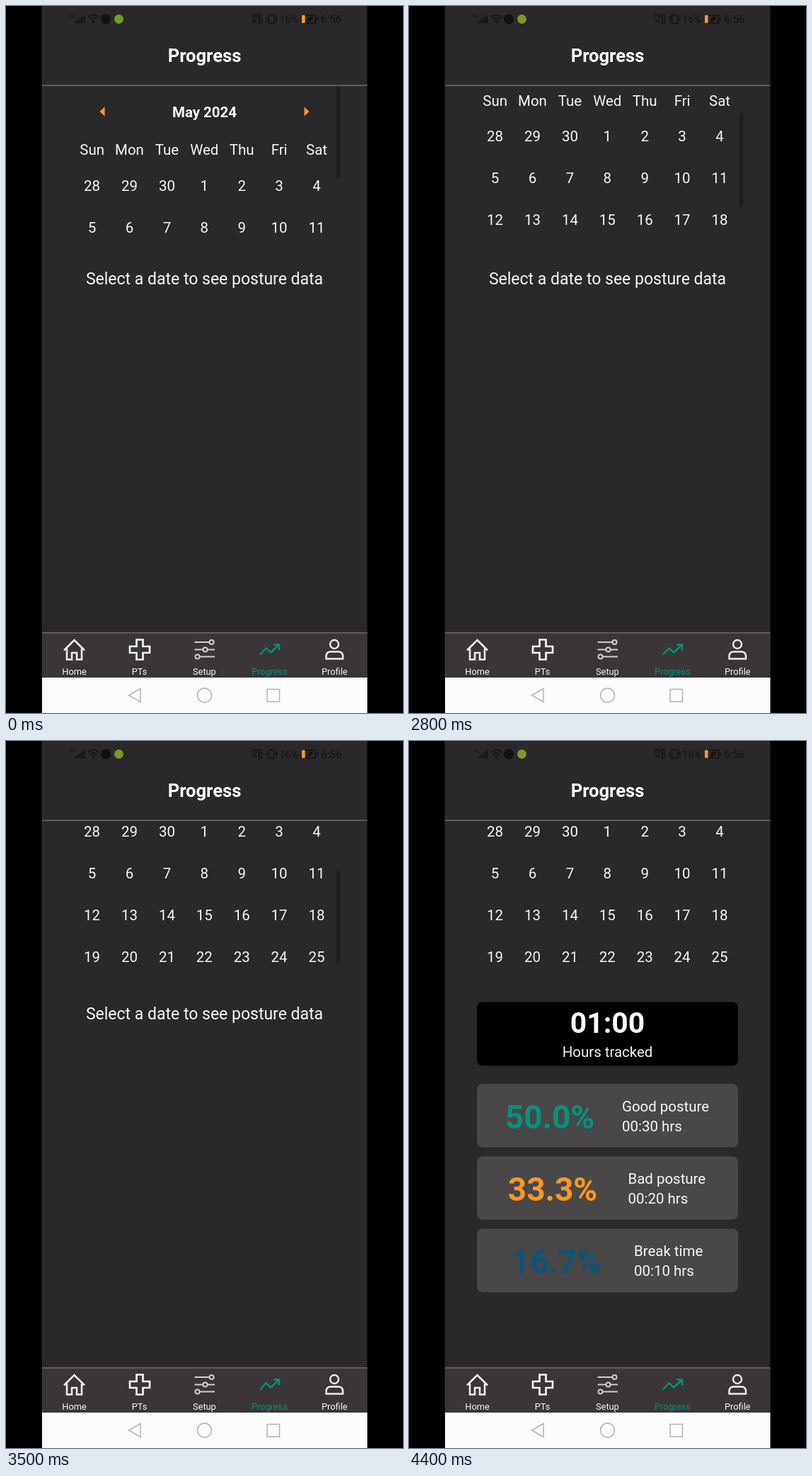
An HTML page with a canvas that plays this animation: 561 px wide and 998 px high, repeating every 8000 ms.

```html
<!DOCTYPE html>
<html lang="en">
<head>
<meta charset="utf-8">
<title>Posture progress</title>
<style>
html, body { margin: 0; width: 100%; height: 100%; overflow: hidden; background: #000; }
canvas { display: block; }
</style>
</head>
<body>
<canvas id="stage" width="561" height="998"></canvas>
<script>
const ctx = document.getElementById('stage').getContext('2d');
const LOOP = 8000, STEP = 100, SCROLL_END = 125.5;
const WHITE = '#f8f7f8', ORANGE = '#f99b2d', TEAL = '#07917d', DARK = '#131213';
const BODY = 20.44;

function rect(x, y, w, h, color, radius = 0) {
  ctx.fillStyle = color;
  ctx.beginPath();
  ctx.roundRect(x, y, w, h, radius);
  ctx.fill();
}

function text(str, x, y, size = BODY, color = WHITE, weight = 400, align = 'center') {
  ctx.font = `${weight} ${size}px Roboto, sans-serif`;
  ctx.textAlign = align;
  ctx.fillStyle = color;
  ctx.fillText(str, x, y);
}

function line(d, color, width) {
  ctx.strokeStyle = color;
  ctx.lineWidth = width;
  ctx.stroke(new Path2D(d));
}

function fill(d, color) {
  ctx.fillStyle = color;
  ctx.fill(new Path2D(d));
}

function dot(x, y, r, color) {
  ctx.fillStyle = color;
  ctx.beginPath();
  ctx.arc(x, y, r, 0, Math.PI * 2);
  ctx.fill();
}

// A drag, then a decaying fling that settles at the end.
function scrollAt(t) {
  if (t < 2600) return 0;
  if (t < 2800) return 20 + (t - 2600) * 0.2475;
  if (t < 3500) return SCROLL_END - 56 * Math.exp((2800 - t) / 232);
  return SCROLL_END;
}

function statusBar() {
  text('4G', 90, 16, 6, DARK, 400, 'left');
  for (let i = 0; i < 5; i++) rect(98 + i * 2.9, 21.5 - i * 2.2, 1.9, 3 + i * 2.2, DARK);
  line('M116 16Q123.500 9 131 16M118.500 19Q123.500 14.500 128.500 19M121 21.500Q123.500 19.500 126 21.500', DARK, 1.6);
  dot(123.5, 23.5, 1.3, DARK);
  dot(141, 18.5, 7, DARK);
  dot(159.5, 18.5, 6.5, '#779b2c');
  line('M348 16V12.500H361V24H356M348 18.500Q353.500 18.500 353.500 24M348 21.500Q350.500 21.500 350.500 24M351 15.500H358V21H356', DARK, 1.3);
  line('M371.500 12.500H379.500V24.500H371.500ZM368.500 14.500V22.500M382.500 14.500V22.500', DARK, 1.4);
  text('16%', 386.5, 23.5, 14.2, DARK, 400, 'left');
  rect(418, 13, 4.5, 11, ORANGE, 1);
  line('M423 13H437.500V24H423M440 16V21', DARK, 1.4);
  fill('M426 20Q426 15 434 15Q433 22 426 22Z', DARK);
  text('6:56', 445, 23.7, 15.2, DARK, 400, 'left');
}

function calendar(t) {
  const scroll = scrollAt(t);
  ctx.save();
  ctx.beginPath();
  ctx.rect(90, 113, 382, 231);
  ctx.clip();

  ctx.save();
  ctx.translate(0, -scroll);
  fill('M132.500 149L139.500 142.500V155.500Z M428.500 149L421.500 142.500V155.500Z', ORANGE);
  text('May 2024', 280.5, 156.8, BODY, WHITE, 700);
  ['Sun', 'Mon', 'Tue', 'Wed', 'Thu', 'Fri', 'Sat'].forEach((day, i) =>
    text(day, 121.6 + i * 52.9, 210.2));
  for (let i = 0; i < 35; i++) {
    const day = i < 3 ? 28 + i : i - 2;
    const color = i < 3 ? '#757375' : day === 18 ? ORANGE : WHITE;
    if (i === 18 && t >= 3800) {
      ctx.globalAlpha = t < 4200 ? 0.2 : Math.min(1, 0.5 + (t - 4200) / 400);
    }
    text(day, 121.6 + i % 7 * 52.9, 260.8 + Math.floor(i / 7) * 59);
    ctx.globalAlpha = 1;
  }
  ctx.restore();

  ctx.globalAlpha = t < 3900 ? 1 : Math.max(0, 1 - (t - 3800) / 400);
  rect(467, 113 + scroll * 0.565, 5, 130, '#1f1d1f');
  ctx.restore();
}

function card(y, percent, px, color, label, time, x) {
  rect(96, y, 369, 89.5, '#4a4748', 8);
  text(percent, px, y + 63, 46, color, 700);
  text(label, x, y + 39, BODY, WHITE, 400, 'left');
  text(time, x, y + 66.5, BODY, WHITE, 400, 'left');
}

function results() {
  rect(96, 368.5, 369, 90, '#000', 8);
  text('01:00', 280.5, 412.4, 40.9, '#fff', 700);
  text('Hours tracked', 280.5, 445.5);
  card(484, '50.0%', 199, TEAL, 'Good posture', '00:30 hrs', 301);
  card(586.2, '33.3%', 203, '#ff9721', 'Bad posture', '00:20 hrs', 309.5);
  card(688.4, '16.7%', 208, '#0b5578', 'Break time', '00:10 hrs', 318);
}

function tabBar() {
  rect(51, 885, 459.5, 63, '#3a3637');
  rect(51, 884.3, 459.5, 1.3, '#7b797b');
  line('M82 909.500L96.500 895L111 909.500M86 907V922.500H93V913H100V922.500H107V907', '#eeedee', 2.6);
  line('M184.500 894.500H193.500V904H203V913H193.500V922.500H184.500V913H175V904H184.500Z', '#f4f3f4', 2.7);
  line('M266.500 898H287M266.500 908.500H278M285 908.500H295M274 918.500H295', '#d0ced0', 2);
  for (const [x, y] of [[290.5, 898], [281.5, 908.5], [270.5, 918.5]]) {
    line(`M${x - 3} ${y}a3 3 0 1 0 6 0a3 3 0 1 0 -6 0`, '#d0ced0', 2);
  }
  line('M359 915.500L367.500 906.500L374 912.500L385 902.500M378 901.500H386V909.500', TEAL, 2.4);
  line('M458 901a6 6 0 1 0 12 0a6 6 0 1 0 -12 0M452.500 921.500V918Q452.500 911.500 459 911.500H469.500Q476 911.500 476 918V921.500Z', '#eeedee', 2.4);
  ['Home', 'PTs', 'Setup', 'Progress', 'Profile'].forEach((name, i) =>
    text(name, 96.5 + i * 91.95, 944, 12.78, i === 3 ? TEAL : WHITE));

  rect(51, 948, 459.5, 50, '#fdfcfd');
  line('M190 963.500V982.500L173.500 973ZM270.500 973a10 10 0 1 0 20 0a10 10 0 1 0 -20 0M369 964.500H386.500V982H369Z', '#b3b1b4', 1.5);
}

function draw(t) {
  rect(0, 0, 561, 998, '#000');
  rect(50.5, 0, 460, 998, '#2a282a');
  statusBar();
  text('Progress', 280.5, 78.8, 25.56, '#fff', 700);
  rect(51, 111.5, 459.5, 1.3, '#7b797b');
  calendar(t);
  if (t < 4200) text('Select a date to see posture data', 280.5, 393.3, 23);
  else results();
  tabBar();
}

const start = performance.now();
function tick() {
  const t = (performance.now() - start) % LOOP;
  draw(Math.floor(t / STEP) * STEP);
  requestAnimationFrame(tick);
}
tick();
</script>
</body>
</html>
```
